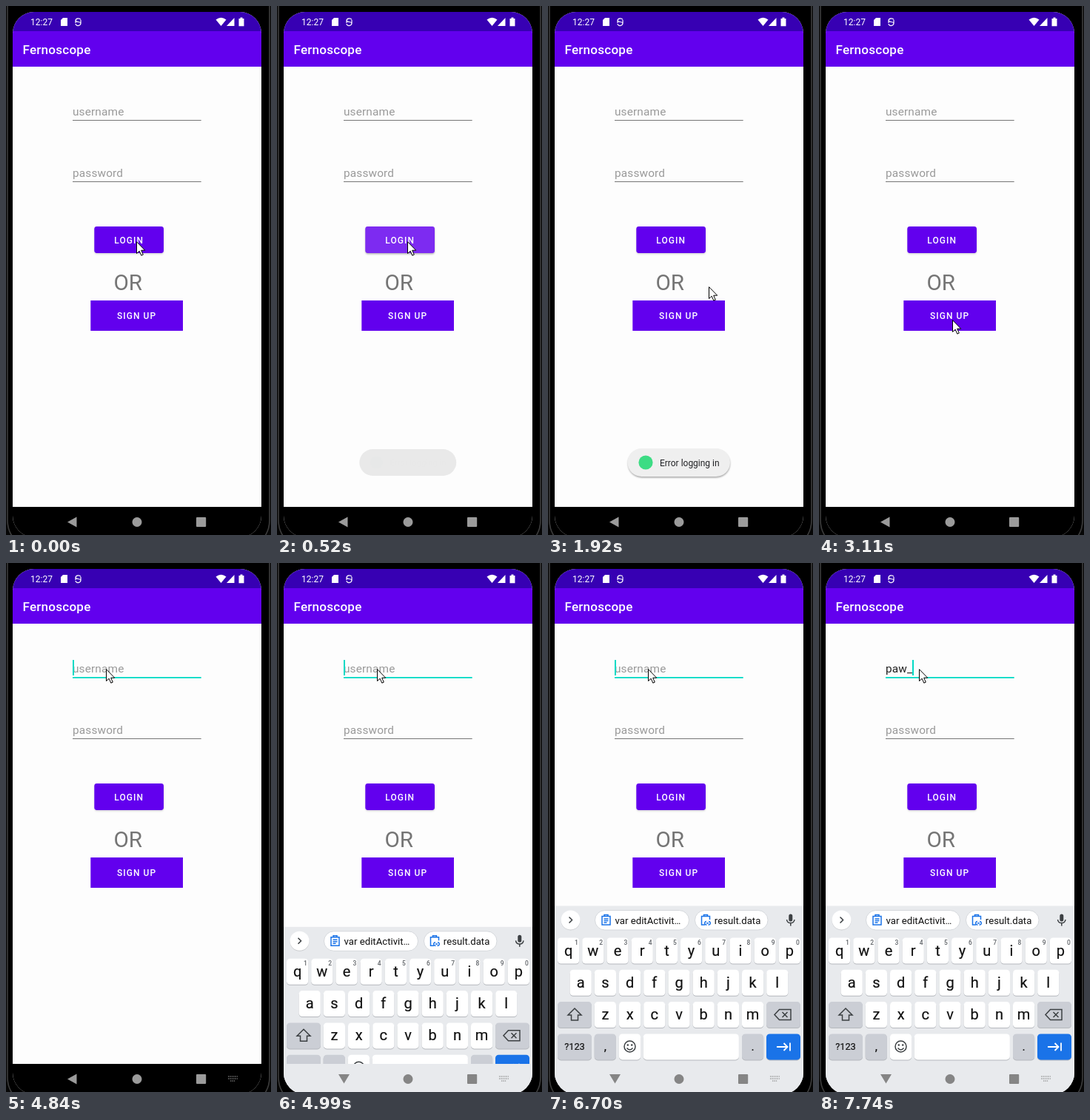
Write an HTML page that moves like this. It is 358 px wide and 715 px high and loops after 8000 ms.

```html
<!DOCTYPE html>
<html lang="en">
<head>
<meta charset="utf-8">
<title>Login screen</title>
<style>
  html, body { margin: 0; width: 100%; height: 100%; overflow: hidden; background: #060606; }
  svg { display: block; width: 358px; height: 715px; font-family: Roboto, sans-serif; }
  .field { font-size: 15.4px; letter-spacing: .14px; }
  .hint { fill: #9a9a9a; }
  .button { font-size: 11.97px; font-weight: 500; letter-spacing: 1.07px; fill: #fff; }
  .key { text-anchor: middle; fill: #111; stroke: #111; stroke-width: .2; }
  .digit { text-anchor: middle; font-size: 8.5px; font-weight: 500; fill: #5f6368; }
  .line { fill: none; stroke-width: 1.5; }
</style>
</head>
<body>
<svg viewBox="0 0 358 715">
  <defs>
    <clipPath id="screen"><rect x="9" y="8" width="336" height="710" rx="29"/></clipPath>
    <clipPath id="loginShape"><rect x="119.3" y="298" width="93.7" height="36" rx="3.4"/></clipPath>
    <filter id="soft" x="-10%" y="-30%" width="120%" height="170%"><feGaussianBlur stdDeviation="1.2"/></filter>
  </defs>

  <rect width="358" height="715" fill="#060606"/>
  <rect x="2" y="-60" width="354" height="795" rx="40" fill="#000" stroke="#3c3c3c" stroke-width="1.6"/>

  <g clip-path="url(#screen)">
    <rect x="9" y="8" width="336" height="710" fill="#fdfdfd"/>
    <rect x="9" y="8" width="336" height="27" fill="#3700b3"/>
    <rect x="9" y="34" width="336" height="48" fill="#6200ee"/>

    <g fill="#fff">
      <text x="33" y="26" font-size="12">12:27</text>
      <path d="M77 16H83V27H74V19Z"/>
      <path d="M101 18.5C99.5 16 94.5 16.5 94 19.5C94 22.5 101 20.5 101 23.5C100.5 27.5 94.5 27.5 94 24M94 19.5V23M101 19V23.5" fill="none" stroke="#fff" stroke-width="1.2"/>
      <path d="M283.5 18.5Q290.5 13 297.5 18.5L290.5 27Z"/>
      <path d="M298 27L308.5 16V27Z"/>
      <path d="M316.5 15.5H319.5V17H321.5V27.2H314.5V17H316.5Z"/>
    </g>
    <text x="22.5" y="64.8" font-size="17.1" font-weight="500" letter-spacing=".21" fill="#fff">Fernoscope</text>

    <text id="hint" class="field hint" x="90" y="148">username</text>
    <text id="name" class="field" x="90" y="148" fill="#212121"></text>
    <rect id="compose" x="90" y="149" height="1" fill="#212121"/>
    <rect id="caret" y="131" width="2" height="21" fill="#03dac5"/>
    <rect id="underline" x="90" y="154" width="173.7"/>
    <text class="field hint" x="90" y="231">password</text>
    <rect x="90" y="237" width="173.7" height="1" fill="#757575"/>

    <rect id="shadow" x="119.5" y="299.5" width="93.5" height="36" rx="3.4" filter="url(#soft)"/>
    <g clip-path="url(#loginShape)">
      <rect x="119" y="298" width="95" height="36" fill="#6200ee"/>
      <circle id="ripple" cx="176" cy="318" fill="#fff"/>
    </g>
    <text class="button" x="146.3" y="320.7">LOGIN</text>
    <text x="145.5" y="384.2" font-size="29.6" fill="#757575">OR</text>
    <rect x="114.3" y="398" width="124.7" height="41" fill="#6200ee"/>
    <text class="button" x="150" y="423.2">SIGN UP</text>

    <g id="toast">
      <rect id="toastShadow" x="108" y="600" width="138" height="37.5" rx="18.7" filter="url(#soft)"/>
      <rect id="pill" x="107.5" y="598" width="138.5" height="38" rx="19"/>
      <g id="message">
        <circle cx="132" cy="617" r="9.6" fill="#3ddc84"/>
        <text x="151" y="621.6" font-size="11.97" fill="#202124">Error logging in</text>
      </g>
    </g>

    <rect x="9" y="677" width="336" height="41" fill="#000"/>
    <g id="keyboard">
      <rect x="9" y="463.5" width="336" height="260" fill="#e8eaed"/>
      <circle cx="30.5" cy="483.4" r="13" opacity=".13"/>
      <circle cx="30.5" cy="482.5" r="13" fill="#fff"/>
      <path class="line" d="M28.5 478.5L32.5 482.5L28.5 486.5" stroke="#3c4043"/>
      <g fill="#fff" stroke="#d5d8dc">
        <rect x="63.5" y="469.5" width="127" height="26.5" rx="13.2"/>
        <rect x="198.5" y="469.5" width="98.5" height="26.5" rx="13.2"/>
      </g>
      <g font-size="13.2" fill="#111">
        <text x="90.5" y="487.5">var editActivit…</text>
        <text x="224.8" y="487.5">result.data</text>
      </g>
      <g class="line" stroke="#1a73e8">
        <path d="M73 477.5H84V489H73ZM76 477.5V475.5H81V477.5M75.5 481H81.5M75.5 483.5H81.5M75.5 486H79.5"/>
        <path d="M212 489H207.5V477.5H218.5V482M210.5 477.5V475.5H215.5V477.5M214 484.5H213.5A2.3 2.3 0 0 0 213.5 489H214.5M217 484.5H217.5A2.3 2.3 0 0 1 217.5 489H216.5M214 486.7H217"/>
      </g>
      <rect x="325.3" y="474.5" width="5" height="10" rx="2.5" fill="#3c4043"/>
      <path class="line" d="M322.5 482A5.3 5.3 0 0 0 333 482M327.8 487V490.5" stroke="#3c4043"/>
      <g id="keys"></g>
      <g class="line" stroke="#3c4043">
        <path d="M36 602L45 611H40.5V618H31.5V611H27Z"/>
        <path d="M306 610.5L312.5 603.5H328V617.5H312.5ZM316.5 607L323.5 614M323.5 607L316.5 614"/>
        <circle cx="110.5" cy="653.5" r="7.5"/>
        <path d="M106.5 655.5Q110.5 660.5 114.5 655.5"/>
      </g>
      <g fill="#3c4043"><circle cx="107.8" cy="651.5" r="1.2"/><circle cx="113.2" cy="651.5" r="1.2"/></g>
      <path d="M309 654H323M318.5 649L323.5 654L318.5 659M327 648.5V659.5" fill="none" stroke="#fff" stroke-width="1.8"/>
    </g>
    <rect id="navLight" x="9" y="677" width="336" height="41" fill="#e8eaed"/>
    <g id="nav">
      <path id="back"/>
      <circle cx="177" cy="697.5" r="6.5"/>
      <rect x="257" y="691" width="13.2" height="13" rx="1"/>
    </g>
    <path id="switcher" d="M300 694H313M300 697H313M303 700H310" stroke="#8c8c8c" stroke-width="1.4" stroke-dasharray="1.4 1" opacity=".8"/>
  </g>

  <path id="pointer" d="M.5 .7V16.5L4.2 13.2L6.8 19.2L9.3 18.1L6.7 12.2H11.7Z" fill="#fff" stroke="#000"/>
</svg>
<script>
const LOOP = 8000;
const NAME = 'paw_';
const FOCUS = 4570, CARET = 4720, OPEN = 4990, TYPE = 6850, LAST = 7740;

const $ = id => document.getElementById(id);
const set = (id, attrs) => {
  for (const k in attrs) $(id).setAttribute(k, attrs[k]);
};
const show = (id, on) => set(id, { visibility: on ? 'visible' : 'hidden' });
const ramp = (t, from, to) => Math.min(1, Math.max(0, (t - from) / (to - from)));
const mix = (a, b, k) => a + (b - a) * k;

// Pointer stops: time, x, y
const PATH = [
  [1500, 176, 318], [1920, 217, 379], [2170, 226, 388], [2570, 226, 388],
  [3110, 180, 424], [3570, 180, 424], [4050, 122, 80], [4170, 135, 143]
];

function pointerAt(t) {
  const i = PATH.findIndex(stop => stop[0] > t);
  if (i === 0) return PATH[0].slice(1);
  if (i < 0) return PATH[PATH.length - 1].slice(1);
  const [t0, x0, y0] = PATH[i - 1], [t1, x1, y1] = PATH[i];
  const k = ramp(t, t0, t1);
  return [mix(x0, x1, k), mix(y0, y1, k)].map(Math.round);
}

function buildKeys() {
  const PITCH = 33.2, W = 29.2, WIDE = 46, GRAY = '#cbced5';
  const TOP = 506.5, ROW = 43.3;
  let out = '';
  const key = (x, row, w, fill, label = '', size = 20) => {
    const y = TOP + row * ROW;
    const box = (dy, color) => `<rect x="${x}" y="${y + dy}" width="${w}" height="35" rx="4.5" fill="${color}"/>`;
    out += box(1, '#b5b8bd') + box(0, fill) +
      `<text class="key" x="${x + w / 2}" y="${y + 17.5 + size * .33}" font-size="${size}">${label}</text>`;
  };
  ['qwertyuiop', 'asdfghjkl', 'zxcvbnm'].forEach((letters, row) => {
    const left = 13 + [0, .5, 1.5][row] * PITCH;
    [...letters].forEach((c, i) => key(left + i * PITCH, row, W, '#fff', c));
  });
  for (let i = 0; i < 10; i++) {
    out += `<text class="digit" x="${38.5 + i * PITCH}" y="516">${(i + 1) % 10}</text>`;
  }
  key(13, 2, WIDE, GRAY);
  key(295, 2, WIDE, GRAY);
  key(13, 3, WIDE, GRAY, '?123', 12.7);
  key(62.7, 3, W, GRAY, ',', 16);
  key(95.9, 3, W, '#fff');
  key(128.7, 3, 129.2, '#fff');
  key(262, 3, W, GRAY, '.', 16);
  key(295, 3, WIDE, '#1a73e8');
  $('keys').innerHTML = out;
}

function drawLogin(t) {
  const press = Math.min(ramp(t, 60, 250), 1 - ramp(t, 520, 790));
  set('ripple', { r: 100 * ramp(t, 60, 400), opacity: .17 * press });
  set('shadow', { opacity: .14 + .14 * press });
}

function drawToast(t) {
  const gone = ramp(t, 2600, 3110);
  const ready = ramp(t, 520, 720);
  const scale = mix(.945, 1, ready) - .03 * gone;
  const tone = Math.round(mix(233, 239, ready));
  set('toast', {
    opacity: ramp(t, 360, 520) * (1 - gone),
    transform: `translate(177 617) scale(${scale}) translate(-177 -617)`
  });
  set('pill', { fill: `rgb(${tone},${tone},${tone})` });
  set('message', { opacity: ready });
  set('toastShadow', { opacity: .35 * ready });
}

function drawField(t) {
  const beat = Math.floor((t - TYPE) / 150);
  const typed = t >= LAST ? 4 : Math.min(3, Math.max(0, beat + 1));
  const composed = t >= LAST ? 0 : Math.min(3, Math.max(0, beat));
  const blinkOn = Math.floor((t - CARET) / 495) % 2 === 0;
  const focused = t >= FOCUS;
  const name = $('name');
  name.textContent = NAME.slice(0, typed);
  const width = n => n ? name.getSubStringLength(0, n) : 0;
  show('hint', !typed);
  show('caret', t >= CARET && (typed || blinkOn));
  set('caret', { x: 90 + Math.round(width(typed)) });
  set('compose', { width: width(composed) });
  set('underline', { height: focused ? 1.8 : 1, fill: focused ? '#03dac5' : '#757575' });
}

function drawKeyboard(t) {
  const open = t >= OPEN;
  show('keyboard', open);
  show('navLight', open);
  show('switcher', t >= 4840);
  set('keyboard', { transform: `translate(0 ${28.5 * (1 - ramp(t, OPEN, OPEN + 150))})` });
  set('nav', { fill: open ? '#858585' : '#9b9b9b' });
  set('back', { d: open ? 'M83 691H98L90.5 703.5Z' : 'M83 697.5L95.5 690.5V704.5Z' });
}

function draw(t) {
  set('pointer', { transform: `translate(${pointerAt(t)})` });
  drawLogin(t);
  drawToast(t);
  drawField(t);
  drawKeyboard(t);
}

buildKeys();
const start = performance.now();
function tick() {
  draw((performance.now() - start) % LOOP);
  requestAnimationFrame(tick);
}
tick();
</script>
</body>
</html>
```
